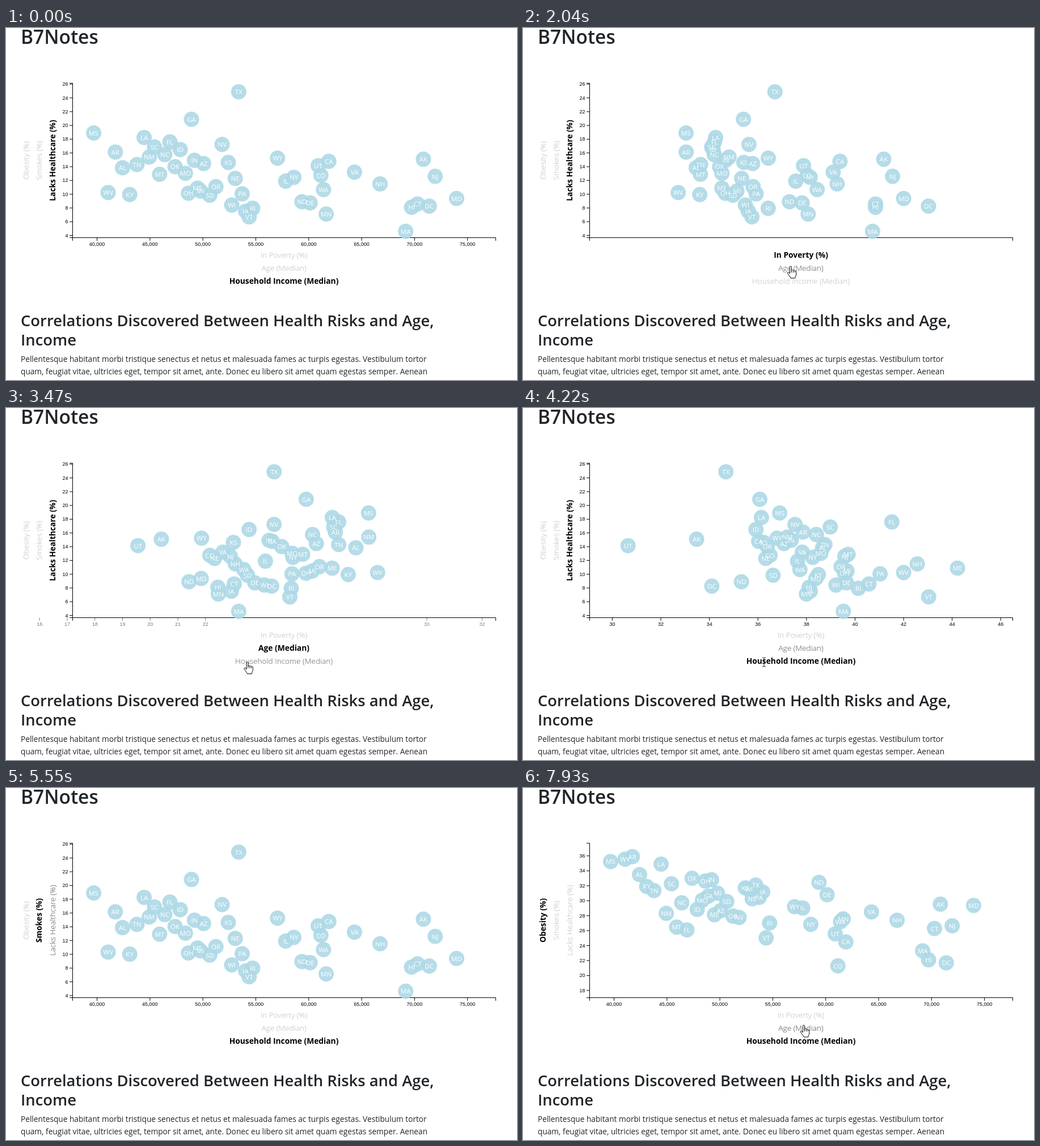
Write an HTML page that moves like this. It is 901 px wide and 622 px high and loops after 8000 ms.

```html
<!DOCTYPE html>
<html lang="en">
<head>
<meta charset="utf-8">
<title>Health risks scatter plot</title>
<style>
  html, body { margin: 0; width: 100%; height: 100%; overflow: hidden; background: #fff; }
  svg { display: block; width: 901px; height: 622px; font-family: "Open Sans", "Noto Sans", sans-serif; }
  .head { font-weight: 600; fill: #212529; }
  .body { font-size: 13.68px; fill: #212529; }
  .axis { font: 9px "Liberation Sans", Arial, sans-serif; }
  .axis path, .axis line { stroke: #000; fill: none; }
  .dot circle { fill: lightblue; opacity: .9; }
  .dot text { fill: #fff; font-size: 11.6px; text-anchor: middle; }
  .label { text-anchor: middle; font-size: 13.6px; font-weight: 300; }
  .label.active { font-size: 13.8px; font-weight: 700; }
</style>
</head>
<body>
<svg viewBox="0 0 901 622">
  <defs><clipPath id="chartClip"><rect x="26" y="43" width="873" height="436"/></clipPath></defs>
  <g class="head">
    <text x="26" y="28" font-size="33.5">B7Notes</text>
    <g font-size="27.4">
      <text x="26" y="527">Correlations Discovered Between Health Risks and Age,</text>
      <text x="26" y="561">Income</text>
    </g>
  </g>
  <g class="body">
    <text x="26" y="590">Pellentesque habitant morbi tristique senectus et netus et malesuada fames ac turpis egestas. Vestibulum tortor</text>
    <text x="26" y="612">quam, feugiat vitae, ultricies eget, tempor sit amet, ante. Donec eu libero sit amet quam egestas semper. Aenean</text>
  </g>
  <g id="chart" clip-path="url(#chartClip)"></g>
  <g id="pointer"></g>
</svg>
<script>
const LOOP = 8000, MOVE = 1000, FADE = 250;
const LEFT = 117.5, RIGHT = 863.5, TOP = 97.5, BOTTOM = 370.5;

const clamp = v => Math.max(0, Math.min(1, v));
const lerp = (a, b, p) => a + (b - a) * p;
const cubic = p => p < .5 ? 4 * p ** 3 : 1 - 4 * (1 - p) ** 3;
const smooth = p => p * p * (3 - 2 * p);
const range = (a, b, step) => Array.from({ length: Math.round((b - a) / step) + 1 }, (_, i) => a + i * step);

// Straight lines through a few [position, value] points
function through(points, at) {
  const i = Math.max(1, points.findIndex(q => q[0] >= at));
  const [a, from] = points[i - 1], [b, to] = points[i];
  return lerp(from, to, (at - a) / (b - a));
}

// Each variable ranks the states from low to high; a curve over the rank gives the value.
const variables = {
  income: {
    rank: 'MS WV AR AL KY TN LA NM SC MT NC FL OK ID MO OH GA IN ME MI AZ SD OR NV KS WI NE TX PA IA VT RI WY IL NY ND DE UT CO WA MN CA VA NH MA HI CT AK DC NJ MD',
    curve: [[0, 39680], [1, 41050], [6, 44450], [14, 48350], [20, 50068], [24, 52400], [31, 54700], [32, 57055],
      [37, 60900], [41, 61900], [44, 69160], [49, 71950], [50, 73971]],
    ticks: range(40000, 75000, 5000), across: true
  },
  poverty: {
    rank: 'NH MD CT NJ AK WY HI MN ND MA UT VA CO IA VT NE DE WA WI KS PA ME SD RI IL ID IN NV MT MO OH NY MI CA FL OK OR NC TX DC SC AZ GA TN WV AR KY AL LA NM MS',
    curve: [[0, 9.2], [1, 10.1], [3, 11.05], [10, 11.7], [16, 12.5], [17, 13.2], [28, 15.4], [36, 16.65],
      [41, 18.15], [44, 18.4], [48, 19.8], [49, 21.3], [50, 21.5]],
    ticks: range(9, 22, 1), across: true
  },
  age: {
    rank: 'UT AK DC TX ND ID CA GA LA KS NE OK CO SD WY MS AZ NM IN NV IL WA VA AR MN HI IA NY MD NC KY MO AL TN SC WI OR MA NJ OH DE MI MT RI CT PA FL WV NH VT ME',
    curve: [[0, 30.5], [1, 33.3], [5, 35.8], [12, 36.35], [19, 37.4], [33, 38.65], [36, 39.3], [42, 39.6],
      [44, 40.4], [49, 42.9], [50, 44.1]],
    ticks: range(30, 46, 2), across: true
  },
  healthcare: {
    rank: 'MA VT MN IA RI HI DC WI CT DE ND MD SD KY PA OH WV MI WA ME OR NH IL NE NY NJ CO MT MO VA AL OK UT TN AZ KS CA IN AK WY NM NC AR ID SC NV FL LA MS GA TX',
    curve: [[0, 4.6], [1, 6.7], [4, 7.95], [10, 8.9], [12, 9.85], [16, 10.25], [20, 11.1], [23, 12.3],
      [29, 13.2], [30, 13.85], [40, 15.4], [46, 17.6], [48, 18.9], [49, 20.9], [50, 24.9]],
    ticks: range(4, 26, 2)
  },
  smokes: {
    rank: 'UT CA HI NY TX MD MA NJ WA CT CO ID MN RI DC VT AZ IL NV OR NE GA WI NH FL KS IA SD NM NC ME VA WY AK DE MT ND PA MO OH AL OK MI SC IN MS LA TN AR KY WV',
    curve: [[0, 9.7], [1, 12.9], [2, 14.05], [6, 14.75], [13, 16.3], [17, 16.55], [24, 17.7], [28, 19],
      [37, 20], [39, 20.95], [43, 21.5], [44, 22.9], [48, 24.7], [49, 26.2], [50, 26.7]],
    ticks: range(8, 28, 2)
  },
  obesity: {
    rank: 'CO DC HI MA CA VT UT FL CT MT NJ NY RI WA NH MN NV OR ME NM VA AZ ID IL WY MD AK NC SD MO NE PA GA DE MI IA TN WI KS KY TX SC ND OH IN OK AL LA MS WV AR',
    curve: [[0, 21.3], [2, 22.1], [4, 24.5], [7, 26.1], [20, 28.5], [28, 29.9], [45, 33], [46, 33.5],
      [47, 34.9], [50, 35.9]],
    ticks: range(18, 36, 2)
  }
};

for (const v of Object.values(variables)) {
  v.values = {};
  v.rank.split(' ').forEach((state, i) => v.values[state] = through(v.curve, i));
  const lo = v.curve[0][1] * (v.across ? .95 : .8), hi = v.curve[v.curve.length - 1][1] * 1.05;
  const [from, to] = v.across ? [LEFT, RIGHT] : [BOTTOM, TOP];
  v.scale = n => lerp(from, to, (n - lo) / (hi - lo));
}
const states = variables.income.rank.split(' ').sort();

// Choices over time: [start, variable]
const xPlan = [[-9999, 'income'], [1670, 'poverty'], [2980, 'age'], [4109, 'income']];
const yPlan = [[-9999, 'healthcare'], [5450, 'smokes'], [6665, 'obesity']];
const clicks = [...xPlan, ...yPlan].map(c => c[0]).filter(s => s > 0);

function stateAt(plan, t) {
  let i = plan.length - 1;
  while (plan[i][0] > t) i--;
  const [start, key] = plan[i];
  const to = variables[key], from = i ? variables[plan[i - 1][1]] : to;
  return { from, to, start, p: cubic(clamp((t - start) / MOVE)) };
}
const tickPos = (s, n) => lerp(s.from.scale(n), s.to.scale(n), s.p);
const dotPos = (s, state) => lerp(s.from.scale(s.from.values[state]), s.to.scale(s.to.values[state]), s.p);

function make(parent, tag, attrs = {}, text) {
  const el = document.createElementNS('http://www.w3.org/2000/svg', tag);
  for (const k in attrs) el.setAttribute(k, attrs[k]);
  if (text !== undefined) el.textContent = text;
  parent.appendChild(el);
  return el;
}
const place = (el, x, y) => el.setAttribute('transform', `translate(${x.toFixed(2)},${y.toFixed(2)})`);
const show = (el, on) => el.style.display = on ? '' : 'none';

const chart = document.getElementById('chart');

function makeAxis(across, path) {
  const g = make(chart, 'g', { class: 'axis', 'text-anchor': across ? 'middle' : 'end' });
  make(g, 'path', { d: path });
  const own = Object.values(variables).filter(v => !!v.across === across);
  const marks = [...new Set(own.flatMap(v => v.ticks))].map(n => {
    const el = make(g, 'g');
    make(el, 'line', across ? { y2: 5.4 } : { x2: -5.4 });
    make(el, 'text', across ? { y: 14.2 } : { x: -8.1, y: 3 }, n.toLocaleString('en-US'));
    return { n, el };
  });
  return s => {
    for (const { n, el } of marks) {
      const alpha = lerp(s.from.ticks.includes(n), s.to.ticks.includes(n), s.p);
      el.setAttribute('opacity', alpha.toFixed(3));
      const at = tickPos(s, n);
      if (across) place(el, at, BOTTOM); else place(el, LEFT, at);
    }
  };
}
const drawX = makeAxis(true, `M${LEFT},${BOTTOM + 5.4}V${BOTTOM}H${RIGHT}v5.4`);
const drawY = makeAxis(false, `M${LEFT - 5.4},${BOTTOM}H${LEFT}V${TOP}h-5.4`);

const dots = make(chart, 'g', { class: 'dot' });
const circles = states.map(() => make(dots, 'circle', { r: 13.5 }));
const names = states.map(s => make(dots, 'text', {}, s));

// Labels stack outwards from the axes
const labels = [
  ['poverty', 'In Poverty (%)', 42], ['age', 'Age (Median)', 41], ['income', 'Household Income (Median)', 92],
  ['obesity', 'Obesity (%)', 38], ['smokes', 'Smokes (%)', 38], ['healthcare', 'Lacks Healthcare (%)', 65]
].map(([key, text, half], i) => {
  const side = i > 2, step = i % 3;
  const x = side ? 35 + 23.4 * step : 490, y = side ? 234 : 401.5 + 22.8 * step;
  const turn = side ? ' rotate(-90)' : '';
  const el = make(chart, 'text', { class: 'label', y: 4.8, transform: `translate(${x},${y})${turn}` }, text);
  return { v: variables[key], half, side, x, y, el, plan: side ? yPlan : xPlan };
});

// Pointer path: [time, x, y]
const route = [
  [300, 655, 585], [620, 300, 470], [1020, 455, 424], [1500, 472, 403], [1720, 472, 403], [1930, 472, 421],
  [3020, 472, 421], [3500, 425, 449], [4220, 425, 449], [4520, 390, 362], [5300, 58, 262], [5550, 60, 262],
  [6690, 34, 240], [6960, 307, 371], [7350, 560, 412], [7840, 495, 419]
];
function pointerAt(t) {
  const i = route.findIndex(r => r[0] > t);
  if (i < 1) return route[i < 0 ? route.length - 1 : 0].slice(1);
  const [t0, x0, y0] = route[i - 1], [t1, x1, y1] = route[i];
  const p = smooth((t - t0) / (t1 - t0));
  return [lerp(x0, x1, p), lerp(y0, y1, p)];
}
function hits(l, [x, y]) {
  const dx = Math.abs(x - l.x), dy = Math.abs(y - l.y);
  return l.side ? dx < 11 && dy < l.half : dx < l.half && dy < 11;
}
// Share of the last FADE ms the pointer spent on the label
const hoverAmount = (l, t) =>
  range(0, 9, 1).filter(i => hits(l, pointerAt(t - i * FADE / 10))).length / 10;

const pointer = document.getElementById('pointer');
const glow = make(pointer, 'circle', { r: 13, fill: '#ff0', opacity: .55 });
const solid = { fill: '#fff', stroke: '#000', 'stroke-linejoin': 'round' };
const shapes = {
  arrow: make(pointer, 'path', { ...solid, d: 'M0,0V15.5L3.7,12.2L6.2,17.8L8.8,16.7L6.4,11.2H11.2Z' }),
  hand: make(pointer, 'path', {
    ...solid,
    d: 'M-1.5,1.5a1.5,1.5 0 0 1 3,0V7.5c0-1.5 3-1.5 3,.5c0-1.3 2.7-1.3 2.7,.7c0-1.2 2.6-1 2.6,.8V14' +
      'c0,3-2,4-2,7H0c0-2-4.5-6-5.5-9c-.4-1.5 1.5-2.3 2.6-.8l1.4,1.8Z M1.5,7.5V11 M4.5,8.5V11 M7.2,9V11'
  }),
  beam: make(pointer, 'path', { fill: 'none', stroke: '#222', d: 'M-3,-8H-1L0,-7L1,-8H3M0,-7V7M-3,8H-1L0,7L1,8H3' })
};

function drawPointer(t) {
  const at = pointerAt(t);
  const over = labels.find(l => hits(l, at));
  let kind = at[1] > 500 && at[0] < 755 ? 'beam' : 'arrow';
  if (over) kind = stateAt(over.plan, t).to === over.v ? 'beam' : 'hand';
  show(pointer, t >= route[0][0]);
  place(pointer, ...at);
  for (const k in shapes) show(shapes[k], k === kind);
  show(glow, clicks.some(c => t > c - 110 && t < c + 20));
}

function drawLabels(t) {
  for (const l of labels) {
    const s = stateAt(l.plan, t), active = s.to === l.v;
    let shade = active ? 0 : lerp(186, 72, hoverAmount(l, t));
    if (s.from === l.v) shade *= clamp((t - s.start) / FADE);
    const c = Math.round(shade);
    l.el.classList.toggle('active', active);
    l.el.style.fill = `rgb(${c},${c},${c})`;
  }
}

function draw(t) {
  const sx = stateAt(xPlan, t), sy = stateAt(yPlan, t);
  drawX(sx);
  drawY(sy);
  states.forEach((state, i) => {
    const x = dotPos(sx, state), y = dotPos(sy, state);
    place(circles[i], x, y);
    place(names[i], x, y + 4.4);
  });
  drawLabels(t);
  drawPointer(t);
}

const begin = performance.now();
function frame() {
  draw((performance.now() - begin) % LOOP);
  requestAnimationFrame(frame);
}
frame();
</script>
</body>
</html>
```
